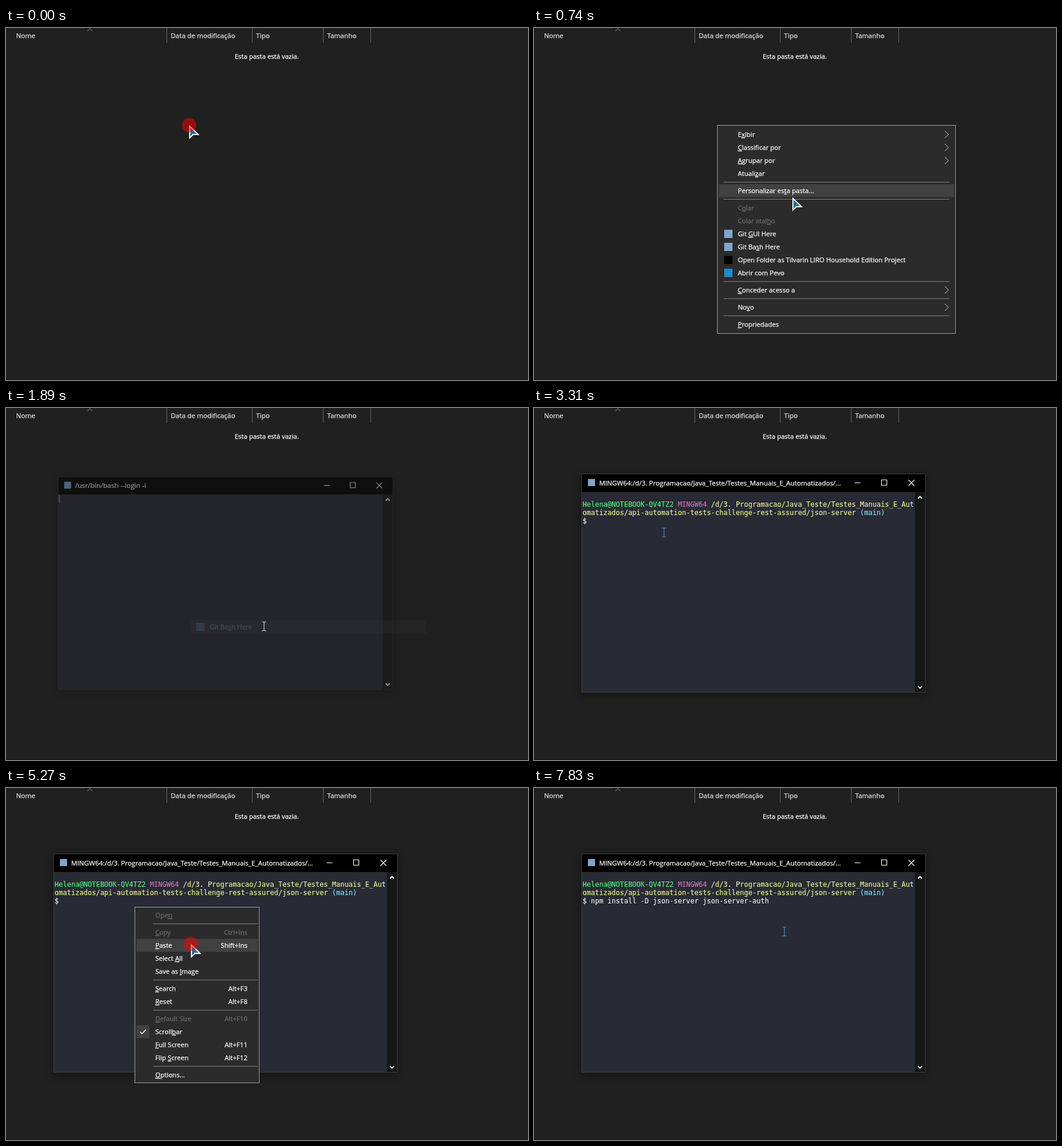
These frames come from a looping animation (881 px wide and 595 px high, 8 s). An HTML page:

```html
<!DOCTYPE html>
<html lang="pt">
<head>
<meta charset="utf-8">
<title>Terminal aberto pelo menu da pasta</title>
<style>
  html, body { margin: 0; width: 100%; height: 100%; overflow: hidden; background: #202020; }
  svg { display: block; width: 100vw; height: 100vh; }
  text {
    font: 11.1px "Open Sans", "Noto Sans", sans-serif; white-space: pre;
    color: #fff; fill: currentColor; stroke: currentColor; stroke-width: .25px;
  }
  .head text { font-size: 11.4px; color: #e4e4e4; }
  text.off { color: #6d6d6d; }
  .end { text-anchor: end; }
  .mono text {
    font: 11.627px "DejaVu Sans Mono", "Liberation Mono", monospace;
    color: #f8f8f2; stroke-width: .12px;
  }
  .line { fill: none; stroke: #fff; }
  .sub { stroke: #d0d0d0; }
  #win { filter: drop-shadow(0 4px 7px rgba(0, 0, 0, .4)); }
</style>
</head>
<body>
<svg id="stage" viewBox="0 0 881 595"></svg>
<script>
const LOOP = 8000;
const BLINK = 530;

const rect = (x, y, w, h, fill, more = '') =>
  `<rect x="${x}" y="${y}" width="${w}" height="${h}" fill="${fill}" ${more}/>`;
const text = (x, y, s, more = '') => `<text x="${x}" y="${y}" ${more}>${s}</text>`;
const line = (d, more = '', cls = '') => `<path class="line ${cls}" d="${d}" ${more}/>`;
const span = (color, s) => `<tspan style="color:${color}">${s}</tspan>`;
const accel = s => s.replace(/&(.)/, '<tspan text-decoration="underline">$1</tspan>');

const folderMenu = {
  id: 'folder', x: 309, y: 164, w: 402, h: 352, textX: 344, sep: [320, 701], pick: 370,
  seps: [261, 290, 429, 458, 487],
  items: [
    { y: 180, s: 'E&xibir', sub: 1 },
    { y: 202, s: '&Classificar por', sub: 1 },
    { y: 224, s: '&Agrupar por', sub: 1 },
    { y: 246, s: 'Atuali&zar' },
    { y: 275, s: 'Personalizar es&ta pasta...' },
    { y: 304, s: 'C&olar', off: 1 },
    { y: 326, s: 'Colar atal&ho', off: 1 },
    { y: 348, s: 'Git &GUI Here', icon: '#7fa5cc' },
    { y: 370, s: 'Git Ba&sh Here', icon: '#7fa5cc' },
    { y: 392, s: 'Open Folder as Tilvarin LIRO Household Edition Project', icon: '#000' },
    { y: 414, s: 'Abrir com Pevo', icon: '#1f8ad2' },
    { y: 443, s: '&Conceder acesso a', sub: 1 },
    { y: 472, s: 'No&vo', sub: 1 },
    { y: 501, s: '&Propriedades' }
  ]
};

const termMenu = {
  id: 'term', x: 217, y: 201, w: 210, h: 297, textX: 252, sep: [248, 425], pick: 266,
  seps: [230, 325, 376, 471],
  items: [
    { y: 215, s: 'Ope&n', off: 1 },
    { y: 244, s: '&Copy', key: 'Ctrl+Ins', off: 1 },
    { y: 266, s: '&Paste', key: 'Shift+Ins' },
    { y: 288, s: 'Select &All' },
    { y: 310, s: 'Save as &Image' },
    { y: 339, s: '&Search', key: 'Alt+F3' },
    { y: 361, s: '&Reset', key: 'Alt+F8' },
    { y: 390, s: '&Default Size', key: 'Alt+F10', off: 1 },
    { y: 412, s: 'Scroll&bar', check: 1 },
    { y: 434, s: '&Full Screen', key: 'Alt+F11' },
    { y: 456, s: 'Flip &Screen', key: 'Alt+F12' },
    { y: 485, s: '&Options...' }
  ]
};

function itemMarkup(menu, it) {
  const right = menu.x + menu.w;
  const cls = it.off ? 'off' : '';
  let s = rect(menu.x + 3, it.y - 11, menu.w - 5, 22, '#414141', 'class="hover"');
  if (it.icon) s += rect(321, it.y - 7, 14, 14, it.icon);
  if (it.sub) s += line(`M${right - 17.5} ${it.y - 6}l6 6l-6 6`, '', 'sub');
  if (it.check) {
    s += rect(menu.x + 3, it.y - 11, 22, 22, '#414141');
    s += line(`M${menu.x + 9.5} ${it.y}l3 3.5l6.5 -7`, 'stroke-width="1.2"');
  }
  s += text(menu.textX, it.y + 4, accel(it.s), `class="${cls}"`);
  if (it.key) s += text(right - 19.5, it.y + 4, it.key, `class="end ${cls}"`);
  return `<g class="item">${s}</g>`;
}

function menuMarkup(m) {
  const [a, b] = m.sep;
  return `<g id="${m.id}"><g class="frame">
    ${rect(m.x + 2, m.y + 2, m.w + 1, m.h + 1, '#000', 'opacity=".2"')}
    ${rect(m.x + .5, m.y + .5, m.w, m.h, '#2b2b2b', 'stroke="#a0a0a0"')}
    ${m.seps.map(y => rect(a, y - 1, b - a, 1, '#808080')).join('')}</g>
    ${m.items.map(it => itemMarkup(m, it)).join('')}</g>`;
}

const explorer = `<g class="head">
  ${text(17, 17, 'Nome')}${text(278, 17, 'Data de modificação')}
  ${text(422, 17, 'Tipo')}${text(542, 17, 'Tamanho')}
  ${[271, 415, 535, 615].map(x => rect(x, 0, 1, 25, '#636363')).join('')}
  ${line('M137.5 5l4 -4l4 4', 'style="stroke:#9a9a9a"')}</g>
  ${text(386, 52, 'Esta pasta está vazia.', 'style="font-size:11px"')}
  ${rect(0, 593.5, 881, 1.5, '#191919')}`;

const command = 'npm install -D json-server json-server-auth';
const terminal = `<g id="win">
  ${rect(80.5, 111.5, 580, 369, '#282a36', 'stroke="#3b3b3b"')}
  ${rect(81, 112, 579, 30, '#000')}
  ${rect(643, 142, 17, 338, '#171717')}
  ${rect(91, 120, 12, 12, '#7fa5cc')}
  ${text(110, 131, '', 'id="title"')}
  ${line('M541 126.5h10M586.5 121.5h9v9h-9zM632 121.5l10 10m0 -10l-10 10', 'stroke-width="1.1"')}
  ${line('M648 153l3.5 -3.5l3.5 3.5M648 470l3.5 3.5l3.5 -3.5', 'stroke-width="1.8"')}
  <g class="mono"><g id="prompt">
    ${text(82, 167, span('#50fa7b', 'Helena@NOTEBOOK-QV4TZ2') + span('#d873b5', ' MINGW64') +
      span('#f1fa8c', ' /d/3. Programacao/Java_Teste/Testes_Manuais_E_Aut'))}
    ${text(82, 181, span('#f1fa8c', 'omatizados/api-automation-tests-challenge-rest-assured/json-server') +
      span('#8be9fd', ' (main)'))}
    ${text(82, 195, '$')}</g>
    ${rect(96, 185, 301, 14, '#f8f8f2', 'id="select"')}
    ${text(96, 195, command, 'id="command"')}
    ${rect(0, 0, 1, 14, '#bfbfbf', 'id="caret"')}</g></g>`;

const pointer = `<g id="pointer">
  <g id="arrow">
    <g id="busy" fill="none"><circle cx="10.5" cy="6.5" r="6.5" stroke="#2391ab" stroke-width="4"/>
      <path d="M5 3A6.5 6.5 0 0 1 13 .5M17 7A6.5 6.5 0 0 1 13 12.5" stroke="#e4f4f8" stroke-width="2"/></g>
    <path d="M1 2.2V21.8L6.8 16H15.6Z" fill="#256a94" stroke="#fff" stroke-width="1.8"/></g>
  <path id="beam" d="M-3 -7.5h2.5l1 1l1 -1h2.5M.5 -6.5v13M-3 7.5h2.5l1 -1l1 1h2.5" fill="none" stroke-width="1.2"/>
  <circle id="press" r="12" fill="#f00" opacity=".5"/></g>`;

const stage = document.getElementById('stage');
stage.innerHTML = rect(0, 0, 881, 595, '#202020') + explorer + terminal +
  menuMarkup(folderMenu) + menuMarkup(termMenu) + pointer;
const el = id => document.getElementById(id);
const show = (node, on) => node.setAttribute('visibility', on ? 'inherit' : 'hidden');
const within = (t, a, b) => t >= a && t < b;
const clamp = v => Math.max(0, Math.min(1, v));

// Each move: first step, last step, step count, evenly timed points.
const moves = [
  [400, 1150, 12, [[309, 164], [362, 214], [436, 286], [440, 335], [436, 359]]],
  [1220, 1360, 3, [[436, 359], [435, 369]]],
  [2920, 3500, 9, [[435, 369], [335, 282], [219, 210.5], [217, 201]]],
  [3910, 4460, 9, [[217, 201], [250, 205], [290, 212], [305, 218]]],
  [4530, 5200, 10, [[305, 218], [311, 240], [314, 258], [312, 263.5]]],
  [6680, 7290, 9, [[312, 263.5], [360, 255], [410, 245], [422, 242.5]]]
];

function pointerAt(t) {
  let pos = moves[0][3][0];
  for (const [a, b, n, pts] of moves) {
    if (t < a) break;
    const step = Math.min(n, Math.floor((t - a) / (b - a) * (n - 1) + .05) + 1);
    const at = step / n * (pts.length - 1);
    const i = Math.min(pts.length - 2, Math.floor(at));
    pos = pts[i].map((v, k) => v + (pts[i + 1][k] - v) * (at - i));
  }
  return pos;
}

function drawMenu(menu, t, open, close, y) {
  const fade = t < close ? 1 : clamp(1 - (t - close) / 240);
  const root = el(menu.id);
  show(root, t >= open && fade > 0);
  root.setAttribute('opacity', fade);
  show(root.querySelector('.frame'), t < close);
  root.querySelectorAll('.item').forEach((node, i) => {
    const it = menu.items[i];
    const picked = it.y === menu.pick;
    node.style.display = t < close || picked ? '' : 'none';
    const over = t < close ? !it.off && y > it.y - 11 && y <= it.y + 11 : picked;
    node.querySelector('.hover').style.display = over ? '' : 'none';
  });
}

function drawTerminal(t) {
  const grow = clamp((t - 1750) / 280);
  const scale = .948 + .052 * grow;
  const win = el('win');
  show(win, grow > 0);
  win.setAttribute('opacity', grow);
  win.setAttribute('transform', `translate(370 296) scale(${scale}) translate(-370 -296)`);

  const ready = t >= 2320;
  const title = el('title');
  title.textContent = ready
    ? 'MINGW64:/d/3. Programacao/Java_Teste/Testes_Manuais_E_Automatizados/...'
    : '/usr/bin/bash --login -i';
  title.style.fontSize = ready ? '11.3px' : '11.9px';

  const pasted = t >= 5480, entered = t >= 7290;
  const marked = pasted && !entered;
  show(el('prompt'), t >= 2360);
  show(el('select'), marked);
  show(el('command'), pasted);
  el('command').style.color = marked ? '#282a36' : '#f8f8f2';

  const [x, y, since] = entered ? [82, 199, 7300]
    : pasted ? [397, 185, 5480]
    : t >= 2360 ? [96, 185, 2390] : [82, 143, 1820];
  const caret = el('caret');
  caret.setAttribute('x', x);
  caret.setAttribute('y', y);
  show(caret, t < 2360 || t < since || Math.floor((t - since) / BLINK) % 2 === 0);
}

function drawPointer(t, [x, y]) {
  el('pointer').setAttribute('transform', `translate(${x} ${y})`);
  const beam = within(t, 1820, 3770) || t >= 5480;
  show(el('arrow'), !beam);
  show(el('beam'), beam);
  el('beam').setAttribute('stroke', t < 2720 ? '#c4c4c4' : '#438fbd');
  show(el('busy'), within(t, 4390, 4600));
  const down = [[0, 130], [1560, 1690], [3640, 3770], [5270, 5400]];
  show(el('press'), down.some(([a, b]) => within(t, a, b)));
}

function render(t) {
  const pos = pointerAt(t);
  drawTerminal(t);
  drawMenu(folderMenu, t, 130, 1690, pos[1]);
  drawMenu(termMenu, t, 3770, 5480, pos[1]);
  drawPointer(t, pos);
}

const start = performance.now();
function tick() {
  render((performance.now() - start) % LOOP);
  requestAnimationFrame(tick);
}
tick();
</script>
</body>
</html>
```
